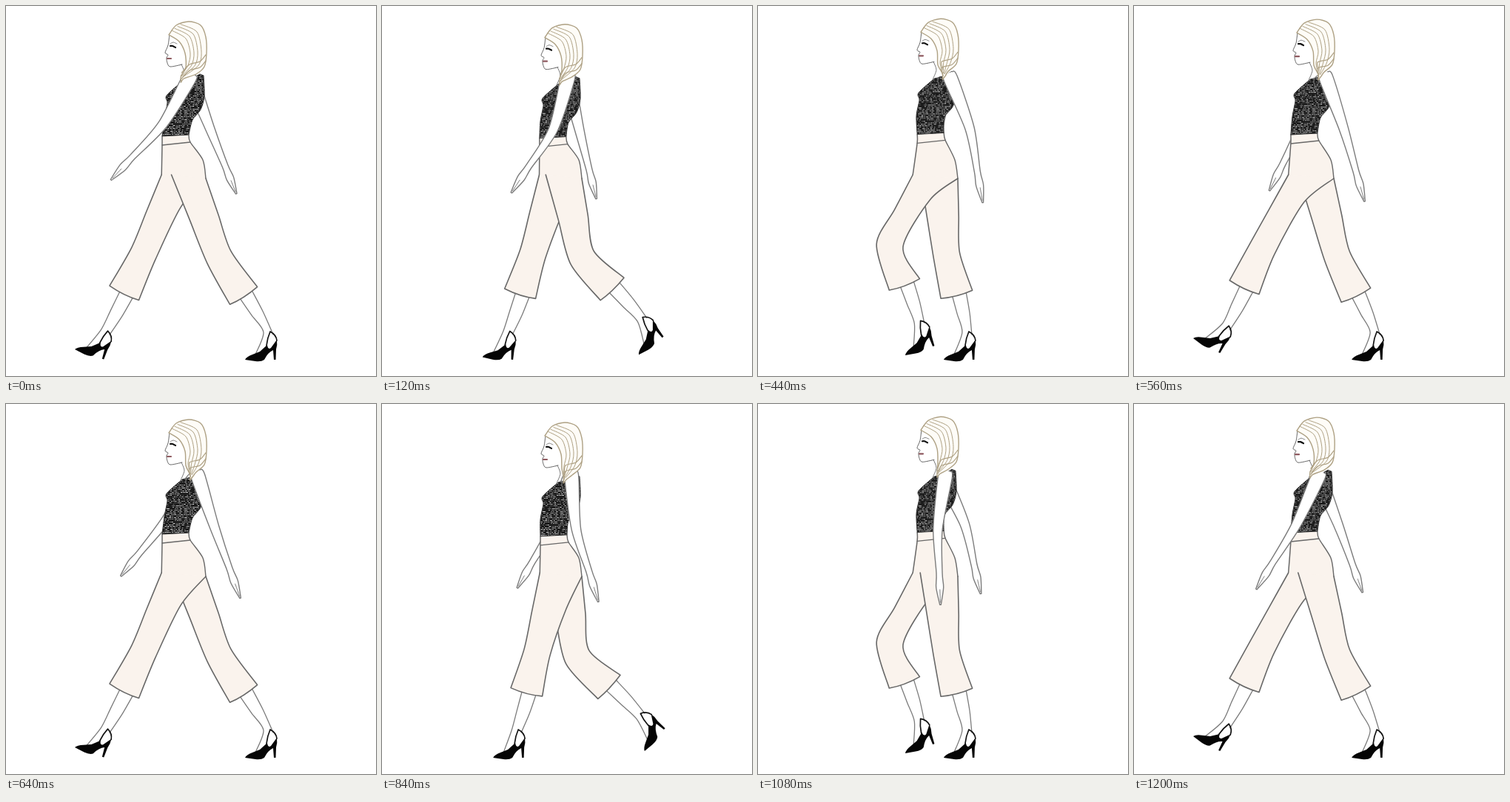
An HTML page with a canvas that plays this animation: 500x500 px, repeating every 1240 ms.

```html
<!DOCTYPE html>
<html lang="en">
<head>
<meta charset="utf-8">
<title>Walk cycle</title>
<style>
html, body { margin: 0; width: 100%; height: 100%; overflow: hidden; background: #fff; }
canvas { display: block; width: 100vw; height: 100vh; object-fit: contain; }
</style>
</head>
<body>
<canvas id="stage" width="500" height="500"></canvas>
<script>
const ctx = document.getElementById('stage').getContext('2d');
const LOOP = 1240, FRAME = 40, STEP = 640, TAU = 2 * Math.PI;
const INK = '#686868', SKIN_INK = '#7c7c7c', CLOTH = '#faf3ed', HAIR = '#aea184';
const HIP = [238, 228], HIP_BACK = [270, 233];

// Stride over two steps: time, toe x, toe y, foot tilt, knee bend.
const STRIDE = [
  [0, 93, 464, 19, 0], [160, 150, 478, 0, 0], [640, 323, 478, 0, 9], [800, 355, 469, -48, 34],
  [880, 326, 470, -47, 32], [1080, 199, 472, -18, 50], [1200, 80, 449, 29, 8]
];
// Arm swing: time, upper arm and forearm angle from the vertical.
const NEAR_SWING = [[0, -30, -43], [240, -2, -24], [440, 21, 10], [640, 18, 20], [840, 5, 17], [1080, -8, 2]];
const FAR_SWING = [[0, 21, 22], [440, -8, -8], [640, -34, -39], [840, -19, -30], [1080, 25, 13]];

const rad = degrees => degrees * Math.PI / 180;
const mix = (a, b, k) => a + (b - a) * k;
const mixPoint = (a, b, k) => [mix(a[0], b[0], k), mix(a[1], b[1], k)];
const polar = ([x, y], angle, length) => [x + Math.sin(rad(angle)) * length, y + Math.cos(rad(angle)) * length];

// Moves p sideways, at a right angle to the line from a to b.
function beside(p, a, b, distance) {
  const dx = b[0] - a[0], dy = b[1] - a[1], k = distance / Math.hypot(dx, dy);
  return [p[0] - dy * k, p[1] + dx * k];
}

function pose(keys, t, period) {
  const i = keys.findLastIndex(key => key[0] <= t);
  const a = keys[i], b = keys[i + 1] || keys[0];
  const k = (t - a[0]) / ((keys[i + 1] ? b[0] : period) - a[0]);
  return a.slice(1).map((v, n) => mix(v, b[n + 1], k));
}

// Adds a smooth curve through the points to a path.
function curve(pts, path = new Path2D(), join = false, tension = 1 / 7) {
  path[join ? 'lineTo' : 'moveTo'](...pts[0]);
  for (let i = 0; i < pts.length - 1; i++) {
    const p = pts[i - 1] || pts[i], a = pts[i], b = pts[i + 1], n = pts[i + 2] || b;
    path.bezierCurveTo(
      a[0] + (b[0] - p[0]) * tension, a[1] + (b[1] - p[1]) * tension,
      b[0] - (n[0] - a[0]) * tension, b[1] - (n[1] - a[1]) * tension, ...b);
  }
  return path;
}

function paint(path, fill, ink, width = 1.3) {
  if (fill) { ctx.fillStyle = fill; ctx.fill(path); }
  if (ink) { ctx.strokeStyle = ink; ctx.lineWidth = width; ctx.stroke(path); }
}

function makeTweed() {
  const tile = document.createElement('canvas');
  tile.width = 70; tile.height = 100;
  const g = tile.getContext('2d');
  let seed = 7;
  const random = () => (seed = seed * 16807 % 2147483647) / 2147483647;
  g.fillStyle = '#1c1c1c';
  g.fillRect(0, 0, 70, 100);
  for (let i = 0; i < 1900; i++) {
    const shade = 110 + random() * 130;
    g.fillStyle = `rgb(${shade},${shade},${shade})`;
    g.fillRect(random() * 70, Math.floor(random() * 50) * 2, .6 + random() * 1.5, .9);
  }
  return ctx.createPattern(tile, 'repeat');
}
const tweed = makeTweed();

function drawArm(shoulder, [upper, fore], upperLength, foreLength) {
  const elbow = polar(shoulder, upper, upperLength), tip = polar(elbow, fore, foreLength);
  const joints = [
    polar(shoulder, upper, -8), shoulder, elbow,
    mixPoint(elbow, tip, .58), mixPoint(elbow, tip, .77), tip
  ];
  const widths = [5, 9.5, 6.2, 4, 5, .8];
  const side = sign => joints.map((p, i) =>
    beside(p, joints[i - 1] || p, joints[i + 1] || p, sign * widths[i]));
  const arm = curve(side(1));
  curve(side(-1).reverse(), arm, true);
  paint(arm, '#fff', SKIN_INK, 1.4);
  paint(curve([mixPoint(elbow, tip, .8), mixPoint(elbow, tip, .97)]), null, SKIN_INK, 1);
}

const SHOE = new Path2D('M0 0Q2-4 10-7L20-11L30-20Q31-13 35-16L43-27Q44-20 42-14L41.500 0H39L38-13Q31-10 26 0Q22 3 14 2Z');
const STRAP = new Path2D('M29-19Q30-29 34-38Q42-34 43-26');

// Builds the trouser outline around the line hip, knee, ankle.
function legAt(phase) {
  const [x, y, tilt, bend] = pose(STRIDE, phase, 2 * STEP);
  const c = Math.cos(rad(tilt)), s = Math.sin(rad(tilt));
  const onFoot = (u, v) => [x + u * c - v * s, y + u * s + v * c];
  const ankle = onFoot(31, -35);
  const knee = beside(mixPoint(HIP, ankle, .5), HIP, ankle, bend);
  const hem = mixPoint(knee, ankle, .5);

  const frontTop = [217 + .13 * (knee[0] - HIP[0]), HIP[1]];
  const frontKnee = beside(knee, HIP, ankle, 18), backKnee = beside(knee, HIP, ankle, -18);
  const crotch = mixPoint(HIP_BACK, backKnee, .5);
  crotch[1] -= .3 * Math.max(0, HIP[0] - knee[0]);
  return {
    x, y, tilt, onFoot,
    front: [frontTop, mixPoint(frontTop, frontKnee, .5), frontKnee, beside(hem, knee, ankle, 22)],
    back: [beside(hem, knee, ankle, -22), backKnee, crotch, HIP_BACK]
  };
}

function drawLeg({ x, y, tilt, onFoot, front, back }) {
  const hem = k => mixPoint(front[3], back[0], k);
  const ankle = onFoot(25, -37), heel = onFoot(38, -34);
  const shin = [hem(.36), mixPoint(hem(.36), ankle, .5), ankle, onFoot(14, -7)];
  const calf = [heel, mixPoint(hem(.85), heel, .5), hem(.8)];
  paint(curve(calf, curve(shin), true), '#fff');
  paint(curve(calf, curve(shin)), null, SKIN_INK);

  ctx.save();
  ctx.translate(x, y);
  ctx.rotate(rad(tilt));
  paint(SHOE, '#050505');
  paint(STRAP, null, '#111', 1.7);
  ctx.restore();

  const cloth = curve(front);
  const mid = hem(.5);
  cloth.quadraticCurveTo(mid[0], mid[1] + 4, ...back[0]);
  curve(back, cloth, true);
  paint(cloth, CLOTH, INK, 1.6);
}

function drawHips(legs, left, right) {
  const thigh = [Math.min(...legs.map(leg => leg.front[0][0])), HIP[1]];
  const bandLeft = [left[0], left[1] + 12], bandRight = [right[0] + 2, right[1] + 10];
  const back = [right, bandRight, [266, 208], HIP_BACK];
  const fill = curve(back);
  [[238, 255], thigh, left].forEach(p => fill.lineTo(...p));
  paint(fill, CLOTH);
  paint(curve(back), null, INK, 1.4);
  paint(curve([left, bandLeft, thigh]), null, INK, 1.5);
  paint(curve([bandLeft, bandRight]), null, INK);
}

function drawTop(bob, left, right) {
  const lift = ([x, y]) => [x, y + bob];
  const top = curve([...[[238, 102], [217, 121], [218, 131], [214, 152]].map(lift), left]);
  curve([right, ...[[252, 154], [263, 140], [268, 122], [267, 94]].map(lift)], top, true);
  top.lineTo(262, 92 + bob);
  top.lineTo(250, 99 + bob);
  top.closePath();
  tweed.setTransform(new DOMMatrix([1, 0, 0, 1, 205, 85 + bob]));
  paint(top, tweed, '#333', 1);
}

function drawHead(bob, tail) {
  ctx.save();
  ctx.translate(0, bob);
  const profile = curve([[221, 38], [219, 53], [215, 63], [219, 66], [217, 70], [218, 77], [222, 82], [238, 79]]);
  paint(profile, '#fff', '#666', 1);
  paint(curve([[237, 79], [241, 90], [236, 103]]), null, '#777', 1);
  paint(curve([[222, 51], [226, 49], [231, 51]]), null, '#777', .9);
  paint(curve([[222, 54], [225, 54], [229, 56]]), null, '#111', 2.2);
  paint(curve([[218, 71], [223, 71]]), null, '#8f5a60', 2.2);

  // Outer line, hairline and strands, all gathered into the tail.
  const outer = [[220, 39], [230, 26], [247, 21], [263, 26], [270, 42], [271, 64], [268, 82], [257, 92], [tail + 4, 98], [tail, 103]];
  const hairline = [[tail, 103], [tail, 95], [243, 83], [242, 64], [234, 48], [220, 39]];
  paint(curve(hairline, curve(outer), true), '#fefcf7', HAIR, 1.4);
  for (let i = 0; i < 4; i++) {
    const k = i / 4;
    paint(curve([
      [224 + 16 * k, 33 - 11 * k], [243 + 20 * k, 44 - 12 * k], [249 + 20 * k, 64 - 4 * k],
      [246 + 19 * k, 80], [tail + 4 * k, 94 + 2 * k]
    ]), null, HAIR, 1);
  }
  for (const y of [66, 74]) {
    paint(curve([[270, y], [262, y + 9], [248, y + 13], [tail + 1, y + 24]]), null, HAIR, 1.2);
  }
  ctx.restore();
}

// The second step starts with a lag and has caught up 440 ms later.
function walkPhase(t) {
  const lag = t < STEP ? 0 : 40 * Math.sin(Math.PI * Math.min(t - STEP, 440) / 440);
  return t - lag;
}

function draw(now) {
  const t = Math.floor(now % LOOP / FRAME) * FRAME;
  const phase = walkPhase(t), beat = TAU * phase / STEP;
  const far = legAt(phase), near = legAt((phase + STEP) % (2 * STEP));
  const bob = 4 * Math.sin(beat), waist = 214 - 3 * Math.cos(beat);
  const left = [waist, 176 + .7 * bob], right = [waist + 36, 174 + .7 * bob];
  const nearSwing = pose(NEAR_SWING, t, LOOP);
  const shoulder = 255 + .25 * nearSwing[0];

  ctx.fillStyle = '#fff';
  ctx.fillRect(0, 0, 500, 500);
  ctx.lineCap = ctx.lineJoin = 'round';
  drawArm([252, 104], pose(FAR_SWING, t, LOOP), 65, 96);
  drawLeg(far);
  drawHips([far, near], left, right);
  drawTop(bob, left, right);
  drawLeg(near);
  drawArm([shoulder, 98], nearSwing, 72, 102);
  drawHead(bob, shoulder - 11);
}

function loop() {
  draw(performance.now());
  requestAnimationFrame(loop);
}
loop();
</script>
</body>
</html>
```
